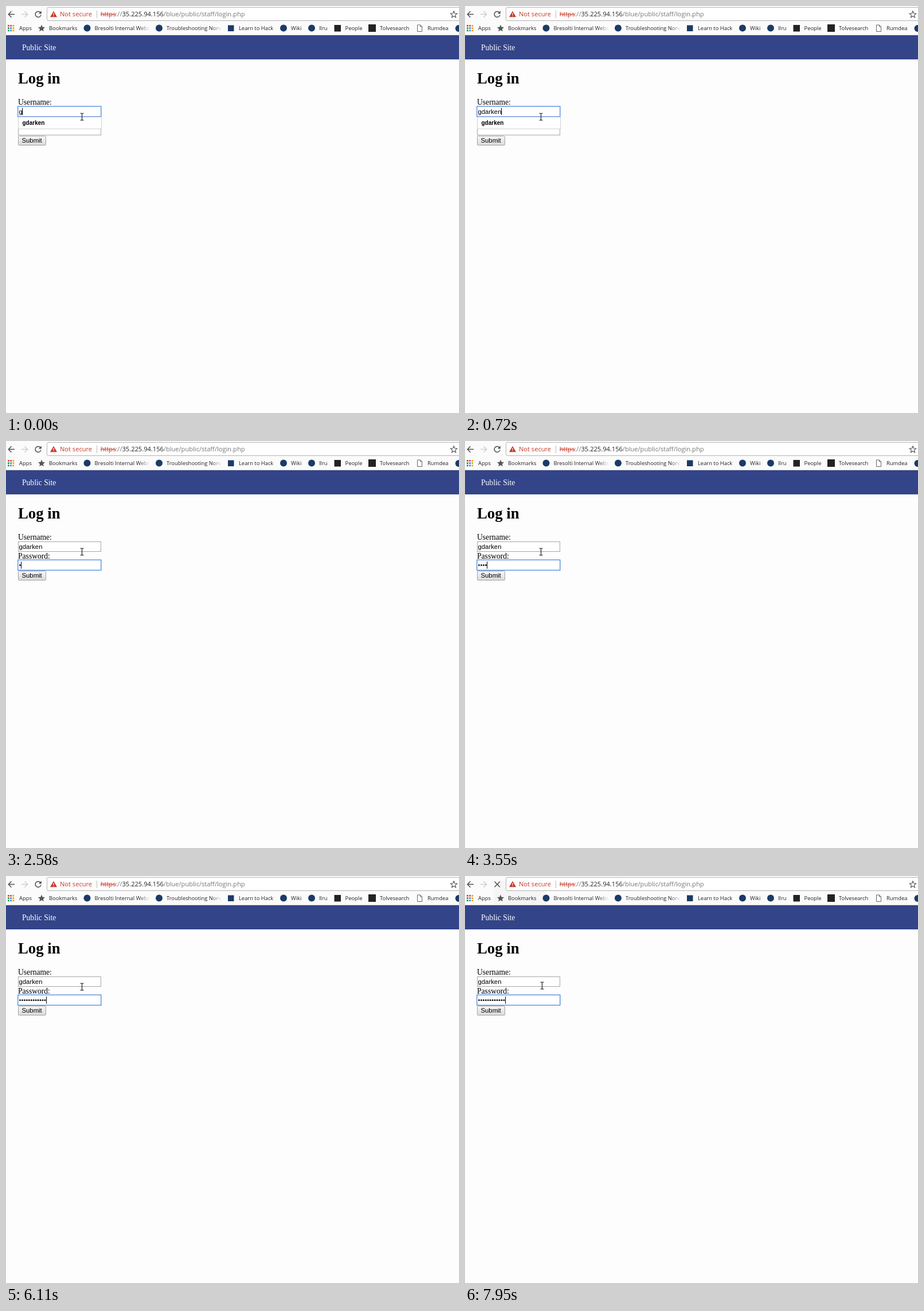
An HTML page that plays this animation: 790 by 709 pixels, repeating every 8000 ms.

```html
<!DOCTYPE html>
<html lang="en">
<head>
<meta charset="utf-8">
<title>Log in</title>
<style>
  html, body { margin: 0; width: 100%; height: 100%; overflow: hidden; background: #fdfdfd; }
  svg { display: block; width: 790px; height: 709px; }
  text { white-space: pre; }
  .ui { font-family: "Open Sans", "Noto Sans", sans-serif; font-size: 9.4px; fill: #222; }
  .url { font-size: 11.1px; }
  .serif { font: 13.6px "Liberation Serif", serif; }
  .field { font: 11.33px "Liberation Sans", sans-serif; }
  .box { fill: #fff; stroke: #a6a6a6; }
  .focus { stroke: #4d88df; stroke-width: 1.3; }
</style>
</head>
<body>
<svg viewBox="0 0 790 709">
  <defs>
    <linearGradient id="fade">
      <stop offset="0" stop-color="#fbfbfb" stop-opacity="0"/>
      <stop offset="1" stop-color="#fbfbfb"/>
    </linearGradient>
    <linearGradient id="button" x2="0" y2="1">
      <stop offset="0" stop-color="#f7f7f7"/>
      <stop offset="1" stop-color="#dadada"/>
    </linearGradient>
  </defs>

  <rect width="790" height="709" fill="#fdfdfd"/>
  <rect width="790" height="51" fill="#fbfbfb"/>
  <path id="tint" d="M50 8H141V50H50Z" fill="#f5f5f5"/>
  <path d="M0 50.5H790" stroke="#d4d4d4"/>

  <!-- toolbar -->
  <g fill="none" stroke-width="1.5">
    <path d="M15 14.5H4.5M9.5 9.3L4.3 14.5L9.5 19.7" stroke="#505050"/>
    <path d="M27 14.5H37.5M32.5 9.3L37.7 14.5L32.5 19.7" stroke="#cfcfcf"/>
    <g id="reload" stroke="#505050">
      <path d="M60 11.2A5 5 0 1 0 61 15.6"/>
      <path d="M61.8 8.6V13.6H56.8Z" fill="#505050" stroke="none"/>
    </g>
    <path id="stop" d="M51.5 9.7L61 19.2M61 9.7L51.5 19.2" stroke="#505050"/>
  </g>
  <rect x="71.5" y="2.5" width="730" height="23" rx="2" fill="#fff" stroke="#b3b3b3"/>
  <path d="M83 8.8L89 19.3H77Z" fill="#c53929"/>
  <path d="M83 12V15.8M83 16.8V18" stroke="#fff" stroke-width="1.2"/>
  <path d="M158.5 8V21" stroke="#bbb"/>
  <text class="ui url" x="94" y="18.4" style="fill:#c53929">Not secure</text>
  <text class="ui url" x="164.7" y="18.4"><tspan fill="#c53929">https</tspan><tspan fill="#777">://</tspan>35.225.94.156<tspan fill="#777">/blue/public/staff/login.php</tspan></text>
  <path d="M165 14.8H192" stroke="#c53929"/>
  <path id="rate" fill="none" stroke="#505050" stroke-width="1.1"/>

  <!-- bookmarks -->
  <g id="apps"></g>
  <path id="saved" fill="#555"/>
  <g id="labels" class="ui"></g>
  <rect x="232" y="30" width="19" height="18" fill="url(#fade)"/>
  <rect x="358" y="30" width="19" height="18" fill="url(#fade)"/>
  <g fill="#1b3a66">
    <circle cx="141.5" cy="38.5" r="6"/>
    <circle cx="267" cy="38.5" r="6"/>
    <rect x="387" y="33.5" width="10.5" height="10.5"/>
    <circle cx="484" cy="38.5" r="6"/>
    <circle cx="533" cy="38.5" r="6"/>
    <circle cx="789.5" cy="39" r="6"/>
  </g>
  <g fill="#222">
    <rect x="572.5" y="33" width="11.5" height="11.5"/>
    <rect x="632" y="32" width="13" height="13"/>
  </g>
  <path d="M717.5 33H722.5L725.5 36V44.5H717.5ZM722.5 33V36H725.5" fill="#fff" stroke="#666"/>

  <!-- page -->
  <rect y="51" width="790" height="42" fill="#334488"/>
  <text class="serif" x="28" y="77" fill="#fff">Public Site</text>
  <text class="serif" x="21" y="135" style="font-size:26.8px;font-weight:bold">Log in</text>
  <text class="serif" x="21" y="171.5">Username:</text>
  <text class="serif" x="21" y="204.5">Password:</text>
  <rect id="userBox"/>
  <rect id="passBox"/>
  <text id="user" class="field" x="22.5" y="187.6"></text>
  <g id="dots"></g>
  <rect x="21.5" y="226.5" width="48" height="16" rx="1" fill="url(#button)" stroke="#a3a3a3"/>
  <text class="field" x="27.5" y="238">Submit</text>
  <g id="suggest">
    <rect x="21.5" y="193.5" width="145" height="20.5" fill="#fff" stroke="#cfcfcf"/>
    <text class="field" x="28.5" y="207" style="font-size:10px;font-weight:bold"></text>
  </g>
  <rect id="caret" width="1" height="12.5"/>
  <path id="beam" d="M-3 -5.5H-1L0 -4.7L1 -5.5H3M0 -4.7V5.7M-3 6.5H-1L0 5.7L1 6.5H3" fill="none" stroke="#111" stroke-width="1.1"/>
  <path id="arrow" d="M131 192V205.4L134 202.6L136.3 207.6L138.5 206.7L136.3 201.8H140.4Z" fill="#fff" stroke="#111" stroke-width=".9"/>
</svg>
<script>
const LOOP = 8000;
const NAME = "gdarken";
const CHAR_X = 22.5, DOT_STEP = 3.95;
const LOAD_AT = 6950, FOCUS_AT = 1000;

// [time, value] steps: each value holds until the next
const nameLength = [[0, 1], [160, 2], [300, 3], [450, 4], [600, 5], [720, 7]];
const dotCount = [[0, 0], [2580, 1], [2860, 2], [3140, 3], [3550, 4], [4280, 5],
                  [5120, 7], [5280, 8], [5990, 10], [6110, 12]];
const caretOn = [[0, true], [1620, false], [2050, true], [4130, false], [4280, true],
                 [6390, false], [6950, true], [7520, false], [7950, true]];
const beamAt = [[0, "132.5 192.5"], [LOAD_AT, null], [7090, "132.5 192.5"], [7950, "134.5 190.5"]];

const el = id => document.getElementById(id);
const show = (id, on) => el(id).setAttribute("visibility", on ? "visible" : "hidden");
const valueAt = (steps, t) => steps.filter(([start]) => start <= t).pop()[1];

function add(parent, tag, attrs, text = "") {
  const node = document.createElementNS("http://www.w3.org/2000/svg", tag);
  for (const key in attrs) node.setAttribute(key, attrs[key]);
  node.textContent = text;
  el(parent).append(node);
  return node;
}

function starPath(cx, cy, r) {
  const points = Array.from({ length: 10 }, (_, i) => {
    const a = i * Math.PI / 5 - Math.PI / 2, d = i % 2 ? r * 0.45 : r;
    return `${cx + d * Math.cos(a)} ${cy + d * Math.sin(a)}`;
  });
  return `M${points.join("L")}Z`;
}

function setField(id, y, focused) {
  const [x, top, width, height] = focused ? [20.8, y - 0.7, 145, 18] : [21.5, y, 144, 17];
  const attrs = { x, y: top, width, height, class: focused ? "box focus" : "box" };
  for (const key in attrs) el(id).setAttribute(key, attrs[key]);
}

el("rate").setAttribute("d", starPath(781, 15, 6));
el("saved").setAttribute("d", starPath(62, 39, 6.5));
["#db4437", "#db4437", "#f4a300", "#0f9d58", "#4285f4", "#f4a300", "#0f9d58", "#4285f4", "#f4a300"]
  .forEach((fill, i) => add("apps", "rect",
    { x: 3 + i % 3 * 4.2, y: 33 + Math.floor(i / 3) * 4.2, width: 2.8, height: 2.8, fill }));
[[23, "Apps"], [75, "Bookmarks"], [154.5, "Bresolti Internal Webs"], [280, "Troubleshooting Norv"],
 [406, "Learn to Hack"], [497, "Wiki"], [546, "Ilru"], [591.5, "People"],
 [652, "Tolvesearch"], [735, "Rumdea"]]
  .forEach(([x, label]) => add("labels", "text", { x, y: 42 }, label));
el("suggest").querySelector("text").textContent = NAME;
const dots = Array.from({ length: 12 }, (_, i) =>
  add("dots", "circle", { cx: CHAR_X + DOT_STEP * (i + 0.5), cy: 216.3, r: 1.4 }));

function render(t) {
  const inPassword = t >= FOCUS_AT, loading = t >= LOAD_AT;
  const count = valueAt(dotCount, t), beam = valueAt(beamAt, t);

  el("user").textContent = NAME.slice(0, valueAt(nameLength, t));
  dots.forEach((dot, i) => dot.setAttribute("visibility", i < count ? "visible" : "hidden"));
  setField("userBox", 175.5, !inPassword);
  setField("passBox", 207.8, inPassword);
  show("suggest", !inPassword);

  const typed = inPassword ? count * DOT_STEP : el("user").getComputedTextLength();
  el("caret").setAttribute("x", Math.floor(CHAR_X + typed + (inPassword ? 0.5 : 0)));
  el("caret").setAttribute("y", inPassword ? 210 : 177.5);
  show("caret", valueAt(caretOn, t));

  show("tint", loading);
  show("stop", loading);
  show("reload", !loading);
  show("arrow", !beam);
  show("beam", beam);
  if (beam) el("beam").setAttribute("transform", `translate(${beam})`);
}

const start = performance.now();
function tick() {
  render((performance.now() - start) % LOOP);
  requestAnimationFrame(tick);
}
tick();
</script>
</body>
</html>
```
